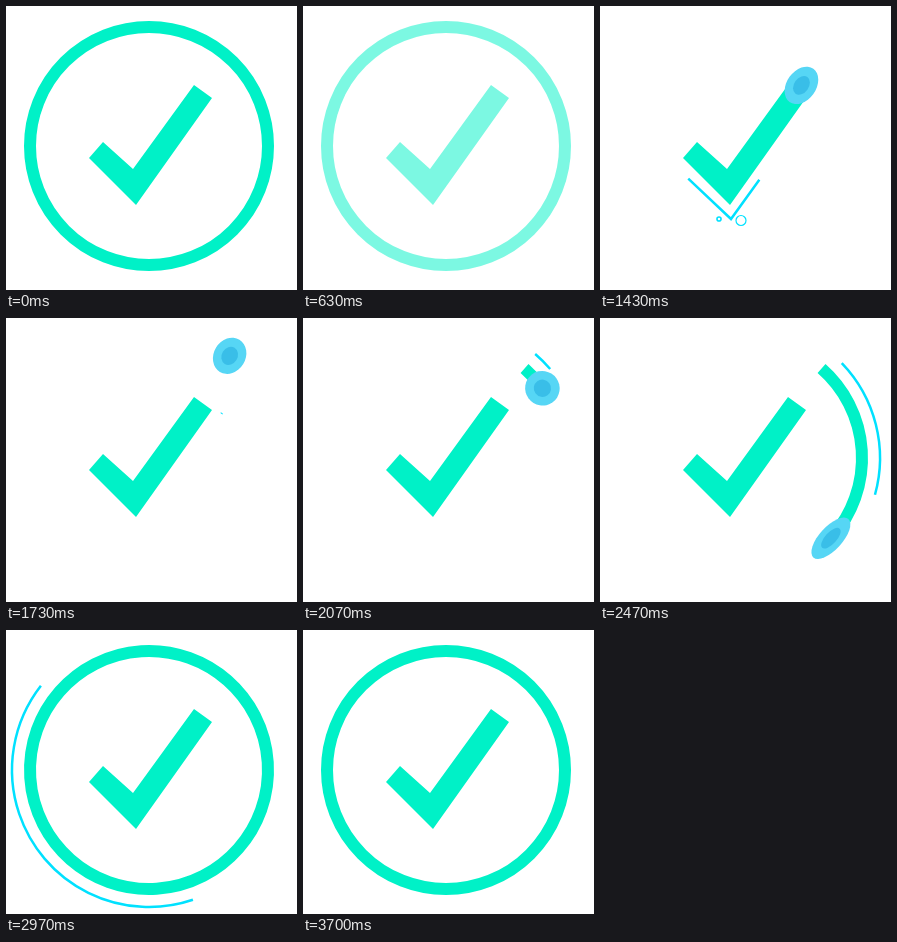
Recreate the animation shown at these times as an HTML page with a canvas. Size 291x284 px, loop 4010 ms.

```html
<!DOCTYPE html>
<html lang="en">
<head>
<meta charset="utf-8">
<title>Check mark</title>
<style>
html, body { margin: 0; width: 100%; height: 100%; overflow: hidden; background: #fff; }
canvas { display: block; width: 100%; height: 100%; }
</style>
</head>
<body>
<canvas id="stage"></canvas>
<script>
const W = 291, H = 284, LOOP = 4010;
const GREEN = '#00f1c7', CYAN = '#00e1ff', DOT = '#56d6f5', CORE = '#39bee8';
const CX = 143, CY = 140, RING = 119, HALO = 137;
const canvas = document.getElementById('stage');
const ctx = canvas.getContext('2d');

const clamp = v => Math.min(1, Math.max(0, v));
const span = (t, a, b) => clamp((t - a) / (b - a));
const mix = (a, b, p) => a + (b - a) * p;
const easeIn = p => p * p;
const easeOut = p => 1 - (1 - p) * (1 - p);
const inOut = (p, n = 2) => p < .5 ? Math.pow(2 * p, n) / 2 : 1 - Math.pow(2 - 2 * p, n) / 2;
const rad = deg => deg * Math.PI / 180;
const between = (a, b, p) => [mix(a[0], b[0], p), mix(a[1], b[1], p)];
const bend = (a, b, c, p) => between(between(a, b, p), between(b, c, p), p);
const onRing = deg => [CX + RING * Math.cos(rad(deg)), CY + RING * Math.sin(rad(deg))];
const distance = (a, b) => Math.hypot(b[0] - a[0], b[1] - a[1]);

const CHECK = [[97, 136], [127, 163], [188, 79], [206, 92], [130, 199], [83, 152]];
const UNDERLINE = [[75, 160], [131, 213], [216, 95]];

// Rest points of the dot, in the order it visits them.
const ENTRY = [-22, 58], WAIT = [45, 72], START = [90, 144];
const CORNER = [128.5, 181], EXIT = [215, 60.5], RING_START = onRing(-36);
const SPINE = [[83, 137], CORNER, EXIT];
const LEG = distance(START, CORNER);
const STROKE = LEG + distance(CORNER, EXIT);

const drawn = t => STROKE * easeOut(span(t, 1180, 1560));
const sweep = t => mix(-36, 324, inOut(span(t, 2020, 3210), 3));

function dotAt(t) {
  if (t < 1030) return bend(ENTRY, [30, 40], WAIT, easeOut(span(t, 800, 1030)));
  if (t < 1180) return bend(WAIT, [28, 95], START, easeIn(span(t, 1030, 1180)));
  if (t < 1560) {
    const s = drawn(t);
    return s < LEG ? between(START, CORNER, s / LEG)
      : between(CORNER, EXIT, (s - LEG) / (STROKE - LEG));
  }
  if (t < 2020) return bend(EXIT, [232, 2], RING_START, inOut(span(t, 1560, 2020)));
  return onRing(sweep(t));
}

function trace(points) {
  ctx.beginPath();
  points.forEach(([x, y]) => ctx.lineTo(x, y));
}

function stroke(width, color) {
  ctx.lineWidth = width;
  ctx.strokeStyle = color;
  ctx.stroke();
}

function strokePart(points, from, to, width, color) {
  if (to <= from) return;
  ctx.save();
  trace(points);
  ctx.setLineDash([to - from, 2000]);
  ctx.lineDashOffset = -from;
  stroke(width, color);
  ctx.restore();
}

function arc(r, from, to, width, color) {
  if (to <= from) return;
  ctx.beginPath();
  ctx.arc(CX, CY, r, rad(from), rad(Math.min(to, from + 360)));
  stroke(width, color);
}

function drawCheck(length) {
  ctx.save();
  trace(CHECK);
  ctx.closePath();
  ctx.clip();
  strokePart(SPINE, 0, length, 60, GREEN);
  ctx.restore();
}

function drawMark(alpha) {
  ctx.globalAlpha = alpha;
  drawCheck(STROKE + 10);
  arc(RING, 0, 360, 12, GREEN);
  ctx.globalAlpha = 1;
}

function drawUnderline(t) {
  const length = distance(UNDERLINE[0], UNDERLINE[1]) + distance(UNDERLINE[1], UNDERLINE[2]);
  const head = length * inOut(span(t, 1175, 1655));
  const tail = length * inOut(span(t, 1350, 1750));
  strokePart(UNDERLINE, tail, head, 2.5, CYAN);
}

function drawHalo(t) {
  const lead = mix(-49.4, -40.5, span(t, 1940, 2060));
  const head = mix(lead, 314, inOut(span(t, 2070, 3496)));
  const rest = mix(-49.4, -45, span(t, 2070, 2470));
  const tail = mix(rest, 314, inOut(span(t, 2335, 3805), 3));
  arc(HALO, tail, head, 2.5, CYAN);
}

function bubble(t, x, y, r, start) {
  const p = span(t, start, start + 330);
  if (p <= 0 || p >= 1) return;
  ctx.beginPath();
  ctx.arc(x, y, r * easeOut(clamp(p * 2.5)), 0, 2 * Math.PI);
  stroke(2 * (1 - p), CYAN);
}

// The dot stretches along its path as it speeds up.
function drawDot(t) {
  const size = 17.3 * (1 - span(t, 2690, 2920));
  if (size <= 0) return;
  const [x, y] = dotAt(t), before = dotAt(t - 4), after = dotAt(t + 4);
  const angle = Math.atan2(after[1] - before[1], after[0] - before[0]);
  const stretch = Math.min(1.5, 1 + .5 * distance(before, after) / 8);
  for (const [k, color] of [[1, DOT], [.5, CORE]]) {
    ctx.beginPath();
    ctx.ellipse(x, y, size * k * stretch, size * k / stretch, angle, 0, 2 * Math.PI);
    ctx.fillStyle = color;
    ctx.fill();
  }
}

function draw(t) {
  ctx.fillStyle = '#fff';
  ctx.fillRect(0, 0, W, H);
  if (t < 500 || t >= 3700) return drawMark(1);
  if (t < 800) return drawMark(1 - span(t, 490, 780));
  if (t > 1180) drawCheck(drawn(t) + 10);
  drawUnderline(t);
  bubble(t, 141, 214.5, 5, 1300);
  bubble(t, 119, 213, 2.6, 1360);
  if (t > 1960) arc(RING, -48.7, sweep(t), 12, GREEN);
  drawHalo(t);
  bubble(t, 255.5, 50, 5, 3290);
  bubble(t, 241, 35, 2.6, 3350);
  drawDot(t);
}

function fit() {
  const dpr = window.devicePixelRatio || 1;
  canvas.width = Math.round(innerWidth * dpr);
  canvas.height = Math.round(innerHeight * dpr);
  ctx.setTransform(canvas.width / W, 0, 0, canvas.height / H, 0, 0);
}

const began = performance.now();
function tick() {
  draw((performance.now() - began) % LOOP);
  requestAnimationFrame(tick);
}
addEventListener('resize', fit);
fit();
tick();
</script>
</body>
</html>
```
